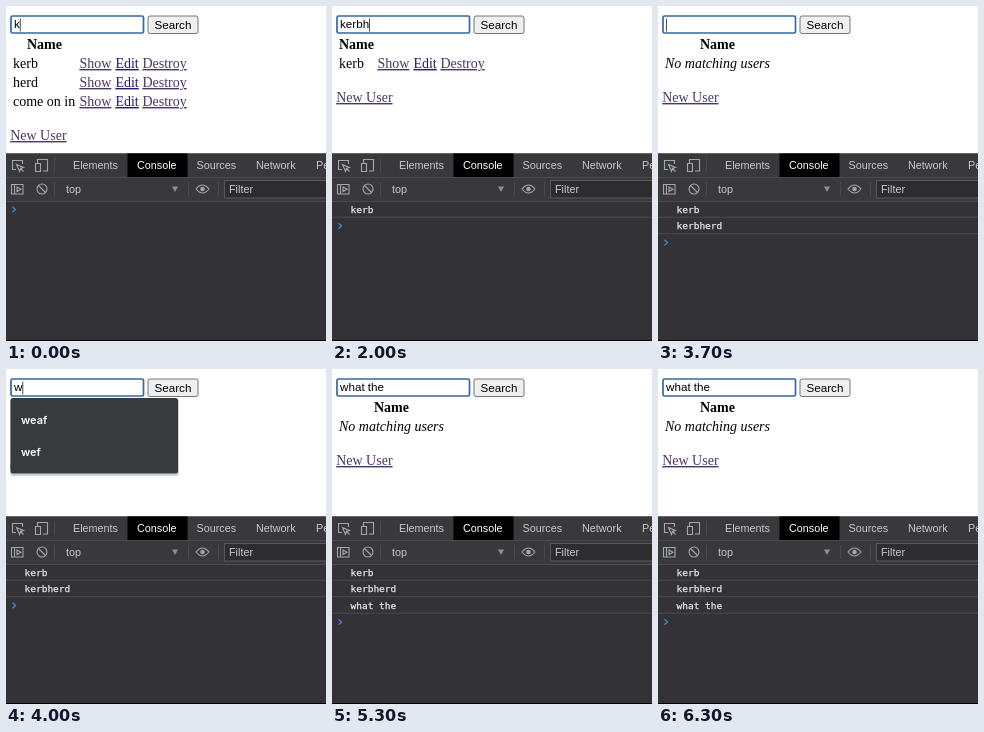
An HTML page that plays this animation: 320x335 px, repeating every 6.6 s.

```html
<!DOCTYPE html>
<html lang="en">
<meta charset="utf-8">
<title>User search with console</title>
<style>
  html, body { margin: 0; width: 100%; height: 100%; overflow: hidden; background: #fff; }
  svg { display: block; }
  text { white-space: pre; }
  .page { font: 14px "Liberation Serif", serif; }
  .form { font: 11.67px "Liberation Sans", sans-serif; }
  .tools { font: 10.8px "Liberation Sans", sans-serif; fill: #c9c9cb; }
  .tools text { stroke: currentColor; stroke-width: 0; }
  .log { font: 9.5px "DejaVu Sans Mono", monospace; fill: #e8e8e8; stroke: #e8e8e8; stroke-width: .25; }
  .link { fill: #4c3569; text-decoration: underline; text-decoration-thickness: .8px; }
  .new { fill: #1c1a7e; }
  .icon { fill: none; stroke: #a4a6a9; stroke-width: 1.1; }
  .rule { stroke: #4a4a4e; }
</style>
<svg width="320" height="335" viewBox="0 0 320 335">
  <g class="page" id="table"></g>

  <g class="form">
    <rect x="5" y="10" width="132.5" height="17" rx="1.5" fill="#fff" stroke="#3668a3" stroke-width="1.7"/>
    <rect id="selection" x="8" y="12" width="46" height="13.5" fill="#b4d5fe"/>
    <text id="query" x="8" y="22.4"></text>
    <rect id="caret" y="12.5" width=".8" height="13" fill="#222"/>
    <rect x="142" y="10" width="50" height="17.5" rx="2" fill="#efefef" stroke="#767676"/>
    <text x="148.500" y="22.500">Search</text>
  </g>

  <g id="suggestions" font-family="Inter, sans-serif" font-size="11" font-weight="600" fill="#fff">
    <rect x="4" y="30" width="169" height="77" rx="3" fill="#000" opacity=".18"/>
    <rect x="4.5" y="29" width="167.5" height="75.5" rx="2.5" fill="#373b3d"/>
    <text x="15" y="55">weaf</text>
    <text x="15" y="87">wef</text>
  </g>

  <g id="status" font-family="Inter, sans-serif" font-size="10.2" fill="#fff">
    <rect y="129" width="320" height="19" fill="#35363a"/>
    <text x="2" y="142">Waiting for localhost...</text>
  </g>

  <g class="tools">
    <rect y="147.500" width="320" height="187.500" fill="#333337"/>
    <rect y="147.500" width="320" height="47.500" fill="#39393d"/>
    <rect x="121.500" y="147.500" width="60" height="23.500" fill="#000"/>
    <path d="M0 334.500H320" stroke="#000"/>
    <path class="rule" d="M0 171.5H320M0 195.5H320M48.5 152v14M48.5 176v14M182.5 176v14M212.5 176v14"/>
    <text x="67" y="163">Elements</text>
    <text x="131" y="163" fill="#fff">Console</text>
    <text x="190.500" y="163">Sources</text>
    <text x="250" y="163">Network</text>
    <text x="310" y="163">Performance</text>
    <text x="60" y="186.500">top</text>
    <rect x="218.500" y="174.500" width="110" height="17.500" fill="#2d2d30" stroke="#58585c"/>
    <text x="223" y="187">Filter</text>
    <g class="icon">
      <path d="M10 163.500H6.500V154.500H16.500V158M10.500 158.500l7 3-3 1-1 3z M14 162l3.500 3.500"/>
      <path d="M31.500 157v-3.500H41.500V165H37M29.500 157.500h5v8h-5z"/>
      <path d="M5.500 178.500h11.500v9.500H5.500zM8.500 178.500v9.500M11 181l4 2.300-4 2.300z"/>
      <circle cx="36" cy="183" r="5"/><path d="M32.500 179.500l7 7"/>
      <path d="M190 183q6.500-8 13 0q-6.500 8-13 0z"/><circle cx="196.500" cy="183" r="1.700" fill="#a4a6a9"/>
    </g>
    <path d="M166 180.500h6l-3 5.500z" fill="#8d8f92"/>
  </g>
  <g id="console"></g>
</svg>
<script>
const LOOP = 6600;
const $ = id => document.getElementById(id);
const names = ["kerb", "herd", "come on in"];

// Each step changes part of the state from its time on.
const steps = [
  [0, { query: "k", table: "all", logs: 0, caret: 1, status: 0, menu: 0, selected: 0 }],
  [100, { query: "ke" }],
  [200, { query: "ker" }],
  [300, { query: "kerb" }],
  [800, { table: "one", logs: 1, caret: 0 }],
  [1300, { caret: 1 }],
  [1800, { caret: 0 }],
  [2000, { query: "kerbh", caret: 1 }],
  [2200, { query: "kerbhe" }],
  [2300, { query: "kerbherd" }],
  [2500, { logs: 2 }],
  [2600, { table: "none" }],
  [2800, { caret: 0 }],
  [3300, { caret: 1 }],
  [3400, { selected: 1, caret: 0 }],
  [3700, { query: "", selected: 0, caret: 1 }],
  [4000, { query: "w", menu: 1 }],
  [4200, { query: "wh", menu: 0 }],
  [4500, { query: "wha" }],
  [4600, { query: "what " }],
  [4700, { query: "what th" }],
  [4800, { query: "what the" }],
  [5300, { logs: 3, caret: 0 }],
  [5500, { status: 0.75 }],
  [5600, { status: 0.42 }],
  [5700, { status: 0.15 }],
  [5800, { status: 0, caret: 1 }],
  [6300, { caret: 0 }],
];
const logLines = ["kerb", "kerbherd", "what the"];

const text = (x, y, label, attrs = "") => `<text x="${x}" y="${y}" ${attrs}>${label}</text>`;
const link = (x, y, label, extra = "") => text(x, y, label, `class="link ${extra}"`);

function tableMarkup(kind) {
  const rows = { all: names, one: names.slice(0, 1), none: [] }[kind];
  const heading = { all: 21, one: 7, none: 42 }[kind];
  const actions = kind === "all" ? 73.4 : 45.4;
  const body = rows.map((name, i) => {
    const y = 62 + 19 * i;
    return text(7, y, name) + link(actions, y, "Show") +
      link(actions + 36, y, "Edit", "new") + link(actions + 63, y, "Destroy");
  }).join("") || text(7, 62, "No matching users", 'font-style="italic"');
  return text(heading, 43, "Name", 'font-weight="bold"') + body +
    link(4.2, kind === "all" ? 134 : 96, "New User");
}

function consoleMarkup(count) {
  const lines = logLines.slice(0, count).map((line, i) => {
    const y = 206.7 + 16.5 * i;
    return text(18.5, y, line, 'class="log"') +
      `<path class="rule" d="M0 ${y + 4.5}H320"/>`;
  }).join("");
  const y = 203.5 + 16.5 * count;
  return lines + `<path d="M6.500 ${y - 2.7}l3 2.700-3 2.700" fill="none" stroke="#4f7fd0" stroke-width="1.300"/>`;
}

let shown = {};
function draw(state) {
  if (state.table !== shown.table) $("table").innerHTML = tableMarkup(state.table);
  if (state.logs !== shown.logs) $("console").innerHTML = consoleMarkup(state.logs);
  $("query").textContent = state.query;
  $("caret").setAttribute("x", 8 + (state.query && $("query").getComputedTextLength()));
  $("caret").setAttribute("opacity", state.caret);
  $("selection").setAttribute("opacity", state.selected);
  $("suggestions").setAttribute("opacity", state.menu);
  $("status").setAttribute("opacity", state.status);
  shown = state;
}

function frame() {
  const t = performance.now() % LOOP;
  draw(Object.assign({}, ...steps.filter(([start]) => start <= t).map(([, change]) => change)));
  requestAnimationFrame(frame);
}
frame();
</script>
</html>
```
